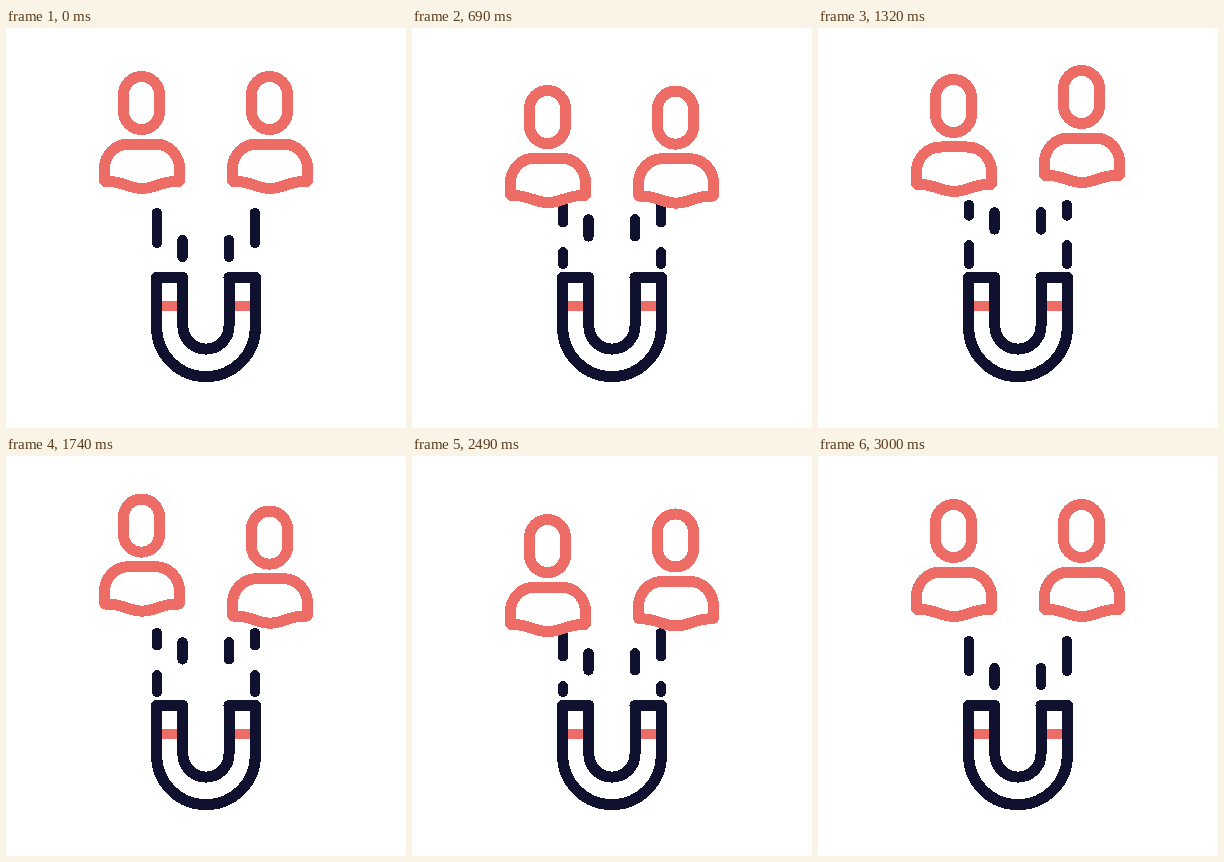
Write an HTML page that moves like this. It is 400 px wide and 400 px high and loops after 3090 ms.

```html
<!DOCTYPE html>
<html lang="en">
<head>
<meta charset="utf-8">
<title>Magnet attracting people</title>
<style>
  html, body { margin: 0; width: 100%; height: 100%; overflow: hidden; background: #fff; }
  svg { display: block; width: 100%; height: 100%; shape-rendering: crispEdges; }
  .ink, .coral { fill: none; stroke-width: 11; stroke-linecap: round; stroke-linejoin: round; }
  .ink { stroke: #10112f; }
  .coral { stroke: #ee6c66; }
  .long, .short { stroke-width: 10.4; }
  .long { stroke-dasharray: 30 30; }
  .short { stroke-dasharray: 17 43; }
</style>
</head>
<body>
<svg viewBox="0 0 400 400">
  <defs>
    <g id="person" class="coral">
      <rect x="117.5" y="48.5" width="36" height="53" rx="18"/>
      <path d="M98.5 152V141C98.5 127 109 116 123 116H149C163 116 173.5 127 173.5 141V152Q173.5 153.5 172 153.5H168C155 154 148 160.5 136 160.5S117 154 104 153.5H100Q98.5 153.5 98.5 152Z"/>
    </g>
  </defs>
  <g class="ink">
    <path class="long" d="M151 177V236"/>
    <path class="long" d="M249 177V236"/>
    <path class="short" d="M176.5 176V235"/>
    <path class="short" d="M223 176V235"/>
  </g>
  <path class="coral" style="stroke-width:10" d="M153 278H175M225 278H250"/>
  <path class="ink" d="M150.6 249.5H176.8V298A23.1 23.1 0 0 0 223 298V249.5H249.4V299.3A49.4 49.4 0 0 1 150.6 299.3Z"/>
  <use id="left" href="#person"/>
  <use id="right" href="#person"/>
</svg>
<script>
const LOOP = 3090, MOVE = 3000, STEP = 30;
const left = document.getElementById('left');
const right = document.getElementById('right');
const longDashes = document.querySelectorAll('.long');
const shortDashes = document.querySelectorAll('.short');

// [time, vertical offset]
const leftKeys = [[0, 0], [890, 16], [1660, -6], [2400, 16], [MOVE, 0]];
const rightKeys = [[0, 0], [570, 16], [1320, -6], [2085, 16], [MOVE, 0]];

function bob(keys, t) {
  const i = Math.max(1, keys.findIndex(([time]) => time >= t));
  const [t0, y0] = keys[i - 1], [t1, y1] = keys[i];
  return y0 + (y1 - y0) * (1 - Math.cos(Math.PI * (t - t0) / (t1 - t0))) / 2;
}

function bezier(x1, y1, x2, y2) {
  const at = (a, b, s) => 3 * (1 - s) ** 2 * s * a + 3 * (1 - s) * s * s * b + s ** 3;
  return x => {
    let lo = 0, hi = 1;
    for (let i = 0; i < 30; i++) {
      const mid = (lo + hi) / 2;
      if (at(x1, x2, mid) < x) lo = mid; else hi = mid;
    }
    return at(y1, y2, (lo + hi) / 2);
  };
}
const flow = bezier(0.15, 0, 0.52, 1);

function shiftDashes(paths, start) {
  paths.forEach(p => p.setAttribute('stroke-dashoffset', -(start % 60)));
}

function render(now) {
  const t = Math.min(MOVE, Math.floor(now % LOOP / STEP) * STEP);
  left.setAttribute('transform', `translate(0 ${bob(leftKeys, t)})`);
  right.setAttribute('transform', `translate(128 ${bob(rightKeys, t)})`);
  const travel = t === MOVE ? 0 : 360 * flow(t / MOVE);
  shiftDashes(longDashes, 8 + travel);
  shiftDashes(shortDashes, 36 + travel);
}

let begin;
function tick(now) {
  begin ??= now;
  render(now - begin);
  requestAnimationFrame(tick);
}
render(0);
requestAnimationFrame(tick);
</script>
</body>
</html>
```
